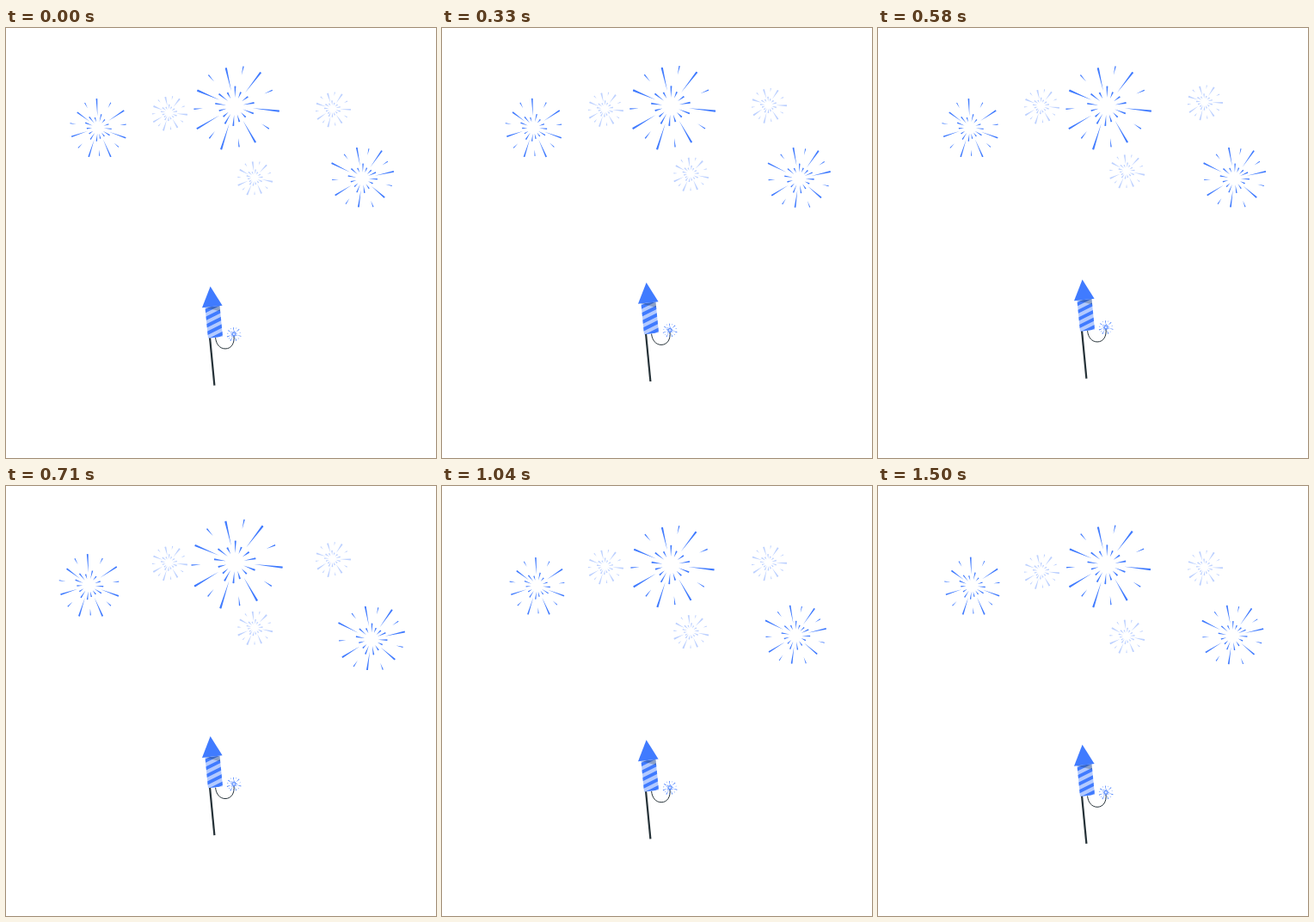
An HTML page for the animation above (1540 ms loop, 500 by 500 pixels).

```html
<!DOCTYPE html>
<html lang="en">
<head>
<meta charset="utf-8">
<title>Fireworks</title>
<style>
  html, body { margin: 0; width: 100%; height: 100%; overflow: hidden; background: #fff; }
  svg { display: block; width: 100vw; height: 100vh; }
</style>
</head>
<body>
<svg viewBox="0 0 500 500">
  <defs>
    <clipPath id="tube"><path d="M231.5 325.5 248.5 323.5 252 359.2 235 361.2Z"/></clipPath>
  </defs>
  <g id="beat" fill="#407bff"></g>
  <g id="float">
    <g id="pale" fill="#bdd1ff"></g>
    <path d="M237 360 242.4 416" stroke="#263238" stroke-width="2.2" fill="none"/>
    <path d="M243.6 360.5C244.2 368 248.6 373.4 255 373.4 262 373.4 266 367 265 358.5" stroke="#263238" fill="none"/>
    <g clip-path="url(#tube)">
      <path d="M225 315H260V365H225Z" fill="#b3caff"/>
      <path id="stripes" stroke="#407bff" stroke-width="3.9"/>
      <path d="M230 325 250 322.5 248.8 330Z" fill="#263238" opacity=".28"/>
    </g>
    <path d="M237.6 300.9 228 325.8 251.6 323.2Z" fill="#407bff"/>
    <g id="spark" fill="#407bff"></g>
    <circle cx="265" cy="356.4" r="1.9" fill="#dbe6ff" stroke="#407bff" stroke-width=".9"/>
  </g>
</svg>
<script>
const LOOP = 1540, STEP = LOOP / 37;
const $ = id => document.getElementById(id);

// tips of the seven long rays, relative to the burst centre
const wide = [[-10, -43.5], [29.5, -38.5], [50.5, 5.5], [23.5, 41], [-15.5, 49], [-43, 25.5], [-42.5, -18]];
const left = [[-1.5, -33], [29.5, -19.5], [31.5, 11.5], [14.5, 33], [-10.5, 33], [-30, 10], [-23.5, -17.5]];
const right = [[-6.5, -35], [22, -31.5], [35.5, -8], [25, 21.5], [-4.5, 32.5], [-31, 19], [-35, -17.5]];

const at = (a, r, off) =>
  (r * Math.cos(a) - off * Math.sin(a)).toFixed(2) + ' ' + (r * Math.sin(a) + off * Math.cos(a)).toFixed(2);

// tapered ray, pointed at the inner end
const ray = (a, r0, r1, w) =>
  `M${at(a, r0, 0)}L${at(a, r1, w / 2)} ${at(a, r1 + w * .15, 0)} ${at(a, r1, -w / 2)}Z`;

function burst(parent, x, y, tips, w, scale = 1, turn = 0) {
  const polar = tips.map(([dx, dy]) => [Math.atan2(dy, dx), Math.hypot(dx, dy) * scale]);
  const mean = polar.reduce((sum, p) => sum + p[1], 0) / polar.length;
  let d = '';
  polar.forEach(([a, r], i) => {
    const next = polar[(i + 1) % polar.length][0];
    const gap = (next - a + 2 * Math.PI) % (2 * Math.PI);
    d += ray(a, r * .4, r, w);
    d += ray(a + gap / 2, mean * .75, mean * .96, w * .65);
    d += ray(a + gap * .28, mean * .2, mean * (i % 2 ? .38 : .47), w * .85);
    d += ray(a + gap * .72, mean * .2, mean * (i % 2 ? .46 : .36), w * .85);
  });
  const path = document.createElementNS('http://www.w3.org/2000/svg', 'path');
  path.setAttribute('d', d);
  path.setAttribute('transform', `translate(${x} ${y}) rotate(${turn})`);
  $(parent).append(path);
}

burst('beat', 110.4, 116.2, left, 1.7);
burst('beat', 265.9, 91.8, wide, 2.2);
burst('beat', 411.1, 173.9, right, 1.8);
burst('pale', 189.5, 99, wide, 2, .42);
burst('pale', 379.5, 94.5, wide, 2, .42, -4);
burst('pale', 289, 174.6, wide, 2, .42, 6);
burst('spark', 265, 356.4, wide, 1, .17, 10);

$('stripes').setAttribute('d',
  [329.5, 338.5, 347.5, 356.5, 365.5].map(y => `M229 ${y + 1.5}L256 ${y - 12}`).join(''));

// linear interpolation through [time, value] points
function track(points, t) {
  const i = points.findIndex(p => p[0] > t);
  const [t0, v0] = points[i - 1], [t1, v1] = points[i];
  return v0 + (v1 - v0) * (t - t0) / (t1 - t0);
}
const lift = [[0, -.45], [697, -10], [1482, 0], [LOOP, -.45]];
const pulse = [[0, 1.0227], [125, 1.1], [410, 1], [549, 1], [696, 1.1], [847, 1], [1477, 1], [LOOP, 1.0227]];

function draw(now) {
  const clock = Math.floor(now % LOOP / 10) * 10;
  const t = Math.floor((clock + 4.9) / STEP) * STEP;
  $('float').setAttribute('transform', `translate(0 ${track(lift, t)})`);
  $('beat').setAttribute('transform', `translate(262 126) scale(${track(pulse, t)}) translate(-262 -126)`);
}

const start = performance.now();
function tick() {
  draw(performance.now() - start);
  requestAnimationFrame(tick);
}
tick();
</script>
</body>
</html>
```
